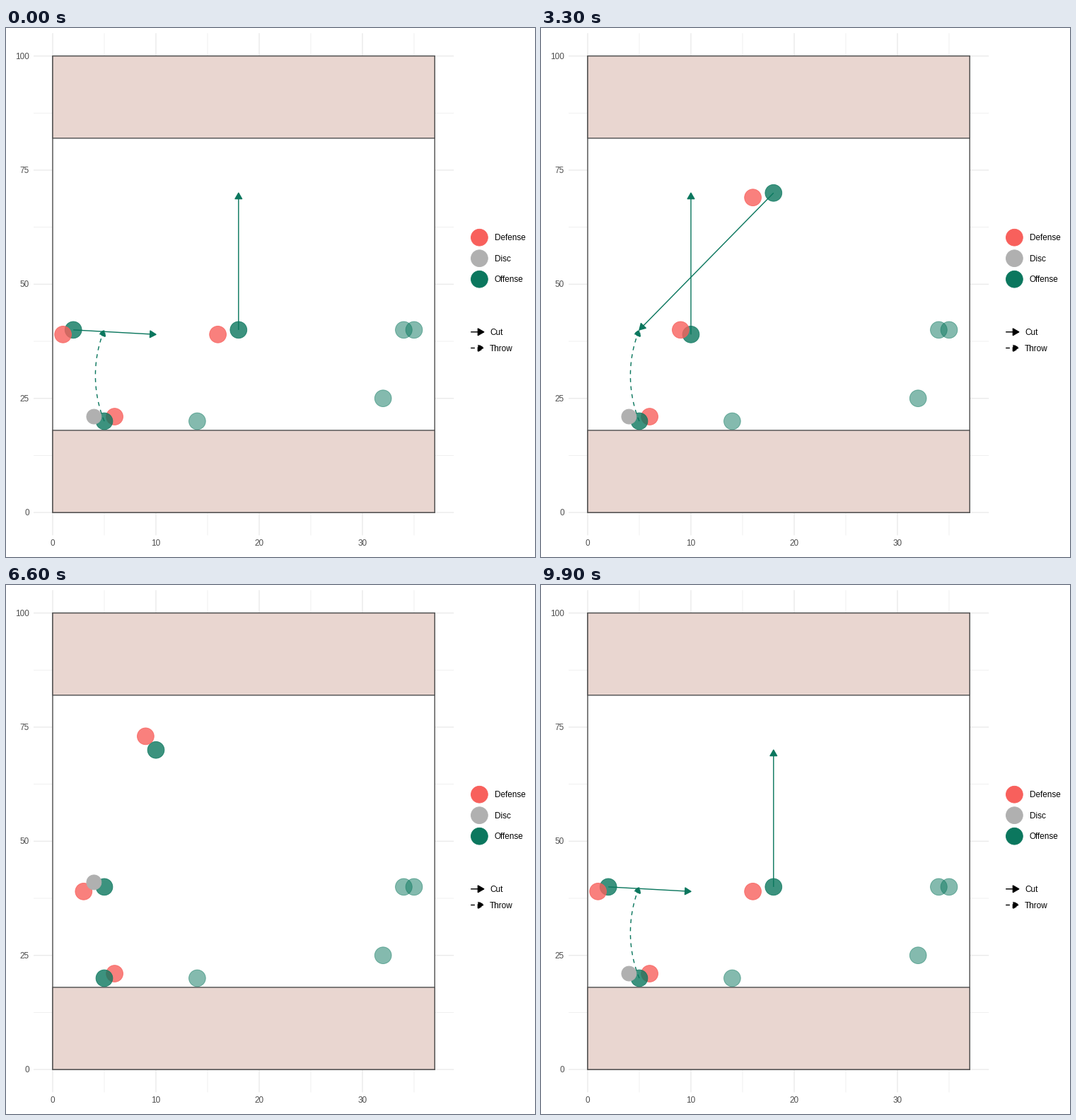
Recreate the animation shown at these times as a matplotlib script. Size 748 by 748 pixels, loop 10000 ms.

```python
import numpy as np
import matplotlib.pyplot as plt
from matplotlib.animation import FuncAnimation
from matplotlib.patches import Circle, Polygon, Rectangle

SIZE, DPI = 748, 88
PT = 72 / DPI  # points per pixel

GREEN, RED, GREY = "#0B775E", "#F8605C", "#B0B0B0"
ZONE, BORDER, GRID = "#E9D6D0", "#505050", "#EBEBEB"
LINE = 1.42
PLAYER_R, DISC_R = 11.85, 10.43

# Panel edges in pixels, and the moves between the three states
LEFT, RIGHT, TOP, BOTTOM = 39.0, 633.2, 7.33, 717.33
MOVES = [(16, 17), (49, 17), (83, 16)]  # first frame, number of steps

fig = plt.figure(figsize=(SIZE / DPI, SIZE / DPI), dpi=DPI, facecolor="white")
ax = fig.add_axes([0, 0, 1, 1])
ax.set_xlim(0, SIZE)
ax.set_ylim(SIZE, 0)
ax.axis("off")


def px(x, y):
    """Field coordinates to stage pixels."""
    return np.array([66 + 14.6 * x, 685.06 - 6.4545 * y])


def line(points, color, width, z, dashed=False):
    xs, ys = np.transpose(points)
    style = (0, (4, 4)) if dashed else "-"
    return ax.plot(xs, ys, color=color, lw=width * PT, ls=style, zorder=z,
                   snap=False, solid_capstyle="butt", dash_capstyle="butt")[0]


def label(x, y, text, color="black", ha="left"):
    ax.text(x, y + 4.1, text, color=color, ha=ha, va="baseline",
            fontsize=11.73 * PT, family="Liberation Sans")


def dot(center, radius, color, alpha, z):
    rgba = plt.matplotlib.colors.to_rgba(color, alpha)
    return ax.add_patch(Circle(center, radius, fc=rgba, ec=rgba,
                               lw=0.945 * PT, zorder=z))


def arrow(points, color, dashed=False):
    """Path with a closed 30 degree head at its last point."""
    points = np.asarray(points, float)
    tip = points[-1]
    back = points[-2] - tip
    angle = np.arctan2(back[1], back[0])
    wings = [tip + 9.6 * np.array([np.cos(a), np.sin(a)])
             for a in (angle - np.pi / 6, angle + np.pi / 6)]
    shaft = line(points, color, LINE, 4, dashed)
    head = Polygon([wings[0], tip, wings[1]], fc=color, ec=color,
                   lw=LINE * PT, ls=(0, (4, 4)) if dashed else "-",
                   joinstyle="round", capstyle="butt", zorder=4)
    return [shaft, ax.add_patch(head)]


def arc(start, end, bend):
    """Circular arc bulging to the left of an upward chord."""
    half = 2 * np.arctan(bend)
    chord = start[1] - end[1]
    radius = chord / 2 / np.sin(half)
    a = np.linspace(-half, half, 40)
    xs = start[0] - radius * (np.cos(a) - np.cos(half))
    ys = (start[1] + end[1]) / 2 - radius * np.sin(a)
    return np.column_stack([xs, ys])


def draw_field():
    for i in range(8):
        x = px(5 * i, 0)[0]
        line([(x, TOP), (x, BOTTOM)], GRID, LINE / (1 + i % 2), 1)
        if i % 2 == 0:
            label(x, 728, str(5 * i), "#4D4D4D", "center")
    for i in range(9):
        y = px(0, 12.5 * i)[1]
        line([(LEFT, y), (RIGHT, y)], GRID, LINE / (1 + i % 2), 1)
        if i % 2 == 0:
            label(32.8, y, str(25 * i // 2), "#4D4D4D", "right")
    for low, high, fill in ((0, 100, "white"), (0, 18, ZONE), (82, 100, ZONE)):
        x0, y0 = px(0, low)
        x1, y1 = px(37, high)
        ax.add_patch(Rectangle((x0, y1), x1 - x0, y0 - y1, fc=fill, ec=BORDER,
                               lw=LINE * PT, zorder=2, snap=False))


def draw_legend():
    rows = (("Defense", RED, PLAYER_R), ("Disc", GREY, PLAYER_R),
            ("Offense", GREEN, PLAYER_R))
    for i, (name, color, radius) in enumerate(rows):
        y = 296.2 + 29.5 * i
        dot((669.4, y), radius, color, 1, 5)
        label(691, y, name)
    for name, y, dashed in (("Cut", 429.8, False), ("Throw", 452.5, True)):
        arrow([(657.2, y), (675.7, y)], "black", dashed)
        label(684, y, name)


draw_field()
draw_legend()

for spot in ((14, 20), (32, 25), (34, 40), (35, 40)):
    dot(px(*spot), PLAYER_R, GREEN, 0.5, 5)

# Each mover: colour, radius, alpha, layer, place in every state
movers = [
    (GREEN, PLAYER_R, 0.8, 6, [(2, 40), (10, 39), (10, 70)]),
    (GREEN, PLAYER_R, 0.8, 6, [(18, 40), (18, 70), (5, 40)]),
    (RED, PLAYER_R, 0.8, 7, [(1, 39), (9, 40), (9, 73)]),
    (RED, PLAYER_R, 0.8, 7, [(16, 39), (16, 69), (3, 39)]),
    (RED, PLAYER_R, 0.8, 7, [(6, 21)] * 3),
    (GREEN, PLAYER_R, 0.8, 8, [(5, 20)] * 3),
    (GREY, DISC_R, 1, 9, [(4, 21), (4, 21), (4, 41)]),
]
dots = [dot(px(*path[0]), r, c, alpha, z) for c, r, alpha, z, path in movers]

cuts = [
    [((2, 40), (10, 39)), ((18, 40), (18, 70))],
    [((10, 39), (10, 70)), ((18, 70), (5, 40))],
    [],
]
cut_artists = [[part for a, b in group for part in arrow([px(*a), px(*b)], GREEN)]
               for group in cuts]
throw = arrow(arc(px(5, 20), px(5, 40), 0.195), GREEN, dashed=True)


def pose(n):
    """State and progress towards the next state."""
    for state, (first, steps) in enumerate(MOVES):
        if n < first + steps:
            return state, max(0, n - first) / steps
    return 0, 0


def update(n):
    state, t = pose(n)
    for circle, (*_, path) in zip(dots, movers):
        here, there = px(*path[state]), px(*path[(state + 1) % 3])
        circle.center = tuple(here + (there - here) * t)
    for i, parts in enumerate(cut_artists):
        for part in parts:
            part.set_visible(i == state)
    for part in throw:
        part.set_visible(state < 2)
    return dots


anim = FuncAnimation(fig, update, frames=100, interval=100, repeat=True,
                     repeat_delay=0, blit=False)
plt.show()
```
